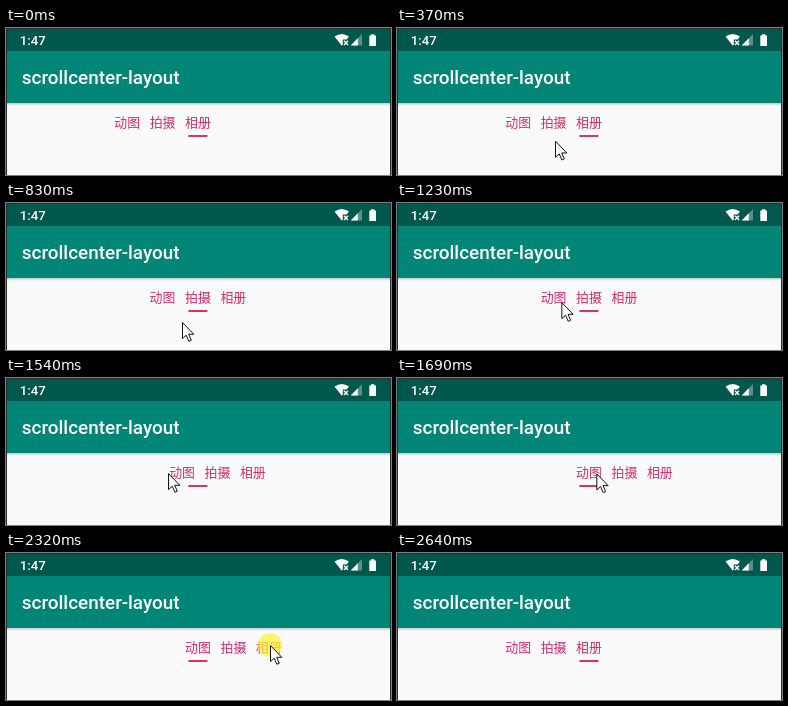
These frames come from a looping animation (385 px wide and 147 px high, 3.35 s). An HTML page:

```html
<!DOCTYPE html>
<html lang="zh-CN">
<head>
<meta charset="utf-8">
<title>scrollcenter-layout</title>
<style>
html, body { margin: 0; width: 100%; height: 100%; overflow: hidden; background: #fafafa; }
svg { display: block; width: 100vw; height: 100vh; }
.bar { font-family: Roboto, sans-serif; font-weight: 500; fill: #fff; }
.tabs { font: 12.9px "Noto Sans CJK SC", "Noto Sans CJK", sans-serif; fill: #db2a69; }
</style>
</head>
<body>
<svg viewBox="0 0 385 147">
  <defs>
    <linearGradient id="shade" x2="0" y2="1">
      <stop offset="0" stop-color="#000" stop-opacity=".2"/>
      <stop offset="1" stop-color="#000" stop-opacity="0"/>
    </linearGradient>
  </defs>
  <rect width="385" height="147" fill="#fafafa"/>
  <rect y="75" width="385" height="3" fill="url(#shade)"/>
  <rect width="385" height="75" fill="#008577"/>
  <rect width="385" height="23" fill="#00574b"/>
  <text class="bar" x="13.8" y="17" font-size="13.2">1:47</text>
  <text class="bar" x="15.8" y="56.4" font-size="18.9">scrollcenter-layout</text>

  <g fill="#fff">
    <path d="M328.5 8.6Q335.8 3.4 343 8.6L340.6 11.6H336.8V16.6L335.8 17.8Z"/>
    <path d="M338 12.7L342 16.9M342 12.7L338 16.9" stroke="#fff" stroke-width="1.4"/>
    <path d="M356 6V17.5H344.8Z" opacity=".35"/>
    <path d="M351.8 10.3V17.5H344.8Z"/>
    <path d="M365 6.2H368.4V7.4H370V18H363.3V7.4H365Z"/>
  </g>

  <g id="tabs" class="tabs">
    <text y="98.5">动图</text>
    <text x="35.4" y="98.5">拍摄</text>
    <text x="70.8" y="98.5">相册</text>
  </g>
  <rect x="182.4" y="107.1" width="19" height="1.8" fill="#d81b60"/>

  <circle id="halo" r="12" fill="#fff23c" opacity=".75"/>
  <path id="arrow" d="M.5 .6V16.6L4.2 13.2L6.9 19.3L9.3 18.2L6.7 12.3H11.8Z" fill="#fff" stroke="#111" stroke-width="1"/>
  <path d="M0 .5H385M.5 0V147M384.5 0V147" stroke="#26302e" fill="none"/>
</svg>
<script>
const LOOP = 3350, LEAD = 200, TICK = 78.4;
const LEFT = 108.3, PITCH = 35.4, SCROLL = 3.2;
const $ = id => document.getElementById(id);
const tabs = $("tabs"), halo = $("halo"), arrow = $("arrow");

// Clicks: tick, and tabs moved by the scroll that follows
const clicks = [[4.9, 1], [15.3, 1], [27.8, -2]];

// Pointer stops: tick, x, y
const stops = [
  [0, 160, 138], [3, 157, 100], [6, 157, 100], [8, 176, 119], [14, 162, 95],
  [17, 162, 95], [23, 274, 96], [25, 264, 92], [28, 264, 92], [30, 299, 130]
];

const clamp = v => Math.min(1, Math.max(0, v));
const ease = v => (1 - Math.cos(Math.PI * clamp(v))) / 2;
const show = (el, on) => { el.style.display = on ? "" : "none"; };

function pointer(k) {
  const i = Math.max(1, stops.findIndex(s => s[0] >= k));
  const [a, ax, ay] = stops[i - 1], [b, bx, by] = stops[i];
  const p = clamp((k - a) / (b - a));
  return `translate(${ax + (bx - ax) * p} ${ay + (by - ay) * p})`;
}

function draw(time) {
  const k = Math.floor((time % LOOP - LEAD) / TICK);
  const shift = clicks.reduce((sum, [at, n]) => sum + n * ease((k - at) / SCROLL), 0);
  tabs.setAttribute("transform", `translate(${LEFT + PITCH * shift} 0)`);

  show(arrow, k >= 0 && k <= 30);
  show(halo, clicks.some(([at]) => Math.abs(k - at) < 0.9));
  for (const el of [arrow, halo]) el.setAttribute("transform", pointer(k));
}

const begin = performance.now();
function frame() {
  draw(performance.now() - begin);
  requestAnimationFrame(frame);
}
frame();
</script>
</body>
</html>
```
